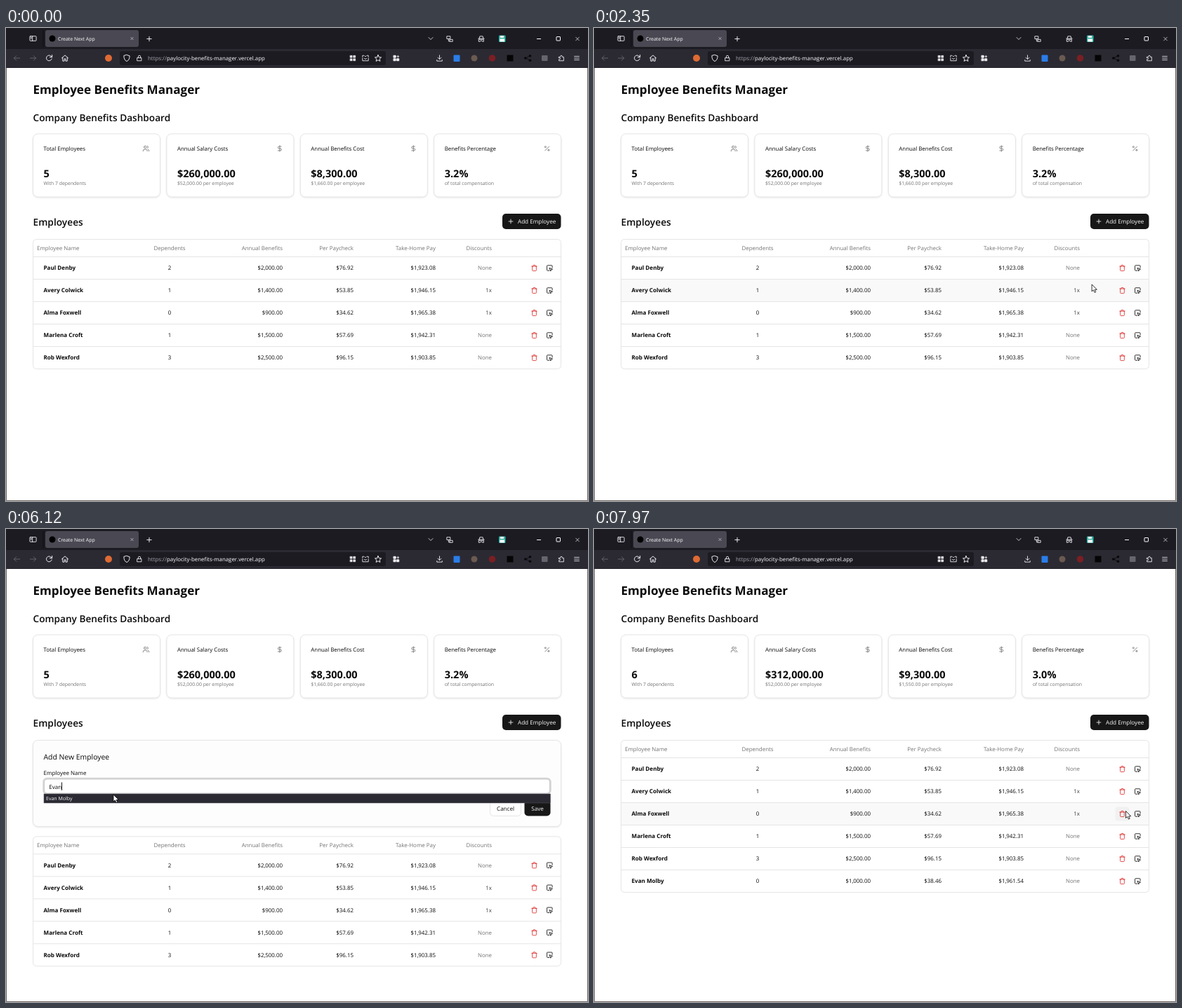
An HTML page for the animation above (8000 ms loop, 829x675 px).

```html
<!DOCTYPE html>
<html lang="en">
<head>
<meta charset="utf-8">
<title>Employee Benefits Manager</title>
<style>
  html, body { margin: 0; width: 100%; height: 100%; overflow: hidden; background: #fff; }
  svg { display: block; width: 100%; height: 100%; }
  text { font-family: "Open Sans", "Noto Sans", sans-serif; white-space: pre; text-rendering: geometricPrecision; }
  .card { filter: drop-shadow(0 1px 1px rgba(0, 0, 0, .09)); }
</style>
</head>
<body>
<svg id="stage" viewBox="0 0 829 675"></svg>
<script>
const INK = '#0a0a0a', GRAY = '#737373', LINE = '#e5e5e5', PALE = '#fbfbfe', DIM = '#6c6b76', RED = '#dc2626';
const LOOP = 8000, FORM_SHIFT = 137.3;
const FULL_NAME = 'Evan Molby';

// ---- drawing helpers ----
const text = (x, y, size, str, o = {}) =>
  `<text x="${x}" y="${y}" font-size="${size}" fill="${o.fill || INK}" font-weight="${o.weight || 400}"` +
  ` text-anchor="${o.anchor || 'start'}"${o.id ? ` id="${o.id}"` : ''}>${str}</text>`;

const box = (x, y, w, h, r, fill, more = '') =>
  `<rect x="${x}" y="${y}" width="${w}" height="${h}" rx="${r}" fill="${fill}" ${more}/>`;

const dot = (x, y, r, fill) => `<circle cx="${x}" cy="${y}" r="${r}" fill="${fill}"/>`;
const line = (x1, y1, x2, y2, c) => `<path d="M${x1} ${y1}L${x2} ${y2}" stroke="${c}"/>`;
const ring = (x, y, r) => `M${x - r} ${y}a${r} ${r} 0 1 0 ${2 * r} 0a${r} ${r} 0 1 0 ${-2 * r} 0`;

// Icon drawn on a 24 unit grid, centred on x, y
const icon = (d, x, y, size, color, weight = 2, fill = 'none') =>
  `<path d="${d}" transform="translate(${x - size / 2} ${y - size / 2}) scale(${size / 24})" fill="${fill}"` +
  ` stroke="${color}" stroke-width="${weight}" stroke-linecap="round" stroke-linejoin="round"/>`;

const ICON = {
  users: 'M16 21v-2a4 4 0 0 0-4-4H6a4 4 0 0 0-4 4v2M22 21v-2a4 4 0 0 0-3-3.87M16 3.13a4 4 0 0 1 0 7.75' + ring(9, 7, 4),
  dollar: 'M12 2v20M17 5H9.5a3.5 3.5 0 0 0 0 7h5a3.5 3.5 0 0 1 0 7H6',
  percent: 'M19 5L5 19' + ring(6.5, 6.5, 2.5) + ring(17.5, 17.5, 2.5),
  plus: 'M5 12h14M12 5v14',
  cross: 'M5 5L19 19M19 5L5 19',
  trash: 'M3 6h18M19 6v14a2 2 0 0 1-2 2H7a2 2 0 0 1-2-2V6M8 6V4a2 2 0 0 1 2-2h4a2 2 0 0 1 2 2v2',
  edit: 'M12 12l10 4l-4.5 1.5L16 22zM21 11V5a2 2 0 0 0-2-2H5a2 2 0 0 0-2 2v14a2 2 0 0 0 2 2h6',
  sidebar: 'M3 4h18a2 2 0 0 1 2 2v12a2 2 0 0 1-2 2H3a2 2 0 0 1-2-2V6a2 2 0 0 1 2-2zM10 4v16M4 8h3M4 12h3',
  chevron: 'M4 8l8 8l8-8',
  screens: 'M3 3h11v9H3zM8 12v8h4M13 14h9v7h-9z',
  hat: 'M2 11h20M5 11l2-8h10l2 8M4 14h16v7h-4l-2-3h-4l-2 3H4z',
  back: 'M22 12H2M10 4l-8 8l8 8',
  forward: 'M2 12h20M14 4l8 8l-8 8',
  reload: 'M20 14a8.5 8.5 0 1 1-2-8l3 3M21 2v7h-7',
  home: 'M2 12L12 3l10 9M5 10v11h5v-7h4v7h5V10',
  shield: 'M12 2l9 3c0 9-3 14-9 17c-6-3-9-8-9-17z',
  lock: 'M5 11h14v10H5zM8 11V7a4 4 0 0 1 8 0v4',
  grid: 'M3 3h7v7H3zM14 3h7v7h-7zM3 14h7v7H3zM14 14h7v7h-7z',
  page: 'M2 8V3h4M22 8V3h-4M2 12v9h20v-9M8 13c2 3 6 3 8 0M9 4l3 3l3-3',
  star: 'M12 2l3 7l7 .6l-5.300 4.800l1.600 7.200L12 18l-6.300 3.600l1.600-7.200L2 9.600L9 9z',
  gridPlus: 'M3 3h7v7H3zM3 14h7v7H3zM14 14h7v7h-7zM17.500 3v7M14 6.500h7',
  download: 'M12 2v13M6 10l6 6l6-6M3 18v4h18v-4',
  share: 'M18 5L6 12l12 7',
  puzzle: 'M4 8h5V6a3 3 0 0 1 6 0v2h5v13H4v-5h2a2.500 2.500 0 0 0 0-5H4z',
  menu: 'M3 5h18M3 12h18M3 19h18'
};

// ---- browser window ----
function browser() {
  const at = (name, x, y, size = 10, color = PALE) => icon(ICON[name], x, y, size, color);
  return box(0, 0, 829, 57, 0, '#1c1b22') + box(0, 30, 829, 26.500, 0, '#2b2a33') +
    line(53, 3, 53, 27, '#0f0e13') +
    box(56, 3, 133, 24, 3, '#4a4953') + dot(66, 15, 4.500, '#000') +
    text(74, 17.800, 6.950, 'Create Next App', { fill: PALE }) +
    at('sidebar', 38.500, 15, 10) + at('cross', 179.500, 15, 6) + at('plus', 204, 15.500, 11) +
    at('chevron', 605, 15, 9) + at('screens', 632, 15.500) + at('hat', 677, 15.500) +
    box(702, 10.500, 9.500, 9.500, 1, '#35b6a8') + box(704, 11, 5, 3, 0, '#eee') + box(703.500, 15.500, 6.500, 4, 0, '#fff') +
    line(756, 15.500, 762, 15.500, PALE) + box(784, 12.500, 5.500, 5.500, .5, 'none', `stroke="${PALE}"`) +
    at('cross', 814, 15.500, 8) +
    box(51, 33, 21, 20, 3, '#53525e', 'id="reloadBg"') +
    at('back', 15.500, 43, 10, DIM) + at('forward', 38.500, 43, 10, DIM) + at('reload', 61.500, 43, 11) + at('home', 84, 43, 11) +
    dot(146, 43, 5, '#e06a33') +
    box(162, 33, 379, 20, 3, '#1c1b22') + at('shield', 172, 43, 11) + at('lock', 190, 43, 10) +
    text(202, 46, 7.900, 'https://', { fill: '#a5a4ad' }) +
    text(229, 46, 7.880, 'paylocity-benefits-manager.vercel.app', { fill: PALE }) +
    icon(ICON.grid, 494, 43, 10, PALE, 1, PALE) + at('page', 512, 43) + at('star', 530, 43, 11) +
    icon(ICON.gridPlus, 556, 43, 10, PALE, 2, PALE) + at('download', 617.500, 43) +
    box(637.500, 38.500, 9, 9.500, 1, '#2b7de9') + dot(667, 43, 4.500, '#6a5a50') + dot(692.500, 43, 4.800, '#7a1f24') +
    box(713.500, 38.500, 9, 9, 0, '#050505') +
    at('share', 743, 43, 10, '#08080a') + dot(739.800, 43, 1.800, '#08080a') + dot(746.500, 39.800, 1.800, '#08080a') + dot(746.500, 46.200, 1.800, '#08080a') +
    box(763, 39, 8.500, 8, 1, '#66656d') + at('puzzle', 791, 43, 10) + at('menu', 813, 43, 9);
}

// ---- page ----
const CARDS = [
  ['Total Employees', 'users', '5', 'With 7 dependents'],
  ['Annual Salary Costs', 'dollar', '$260,000.00', '$52,000.00 per employee'],
  ['Annual Benefits Cost', 'dollar', '$8,300.00', '$1,660.00 per employee'],
  ['Benefits Percentage', 'percent', '3.2%', 'of total compensation']
];
const AFTER = [['6', CARDS[0][3]], ['$312,000.00', CARDS[1][3]], ['$9,300.00', '$1,550.00 per employee'], ['3.0%', CARDS[3][3]]];

const ROWS = [
  ['Paul Denby', '2', '$2,000.00', '$76.92', '$1,923.08', 'None'],
  ['Avery Colwick', '1', '$1,400.00', '$53.85', '$1,946.15', '1x'],
  ['Alma Foxwell', '0', '$900.00', '$34.62', '$1,965.38', '1x'],
  ['Marlena Croft', '1', '$1,500.00', '$57.69', '$1,942.31', 'None'],
  ['Rob Wexford', '3', '$2,500.00', '$96.15', '$1,903.85', 'None'],
  [FULL_NAME, '0', '$1,000.00', '$38.46', '$1,961.54', 'None']
];
const COLUMNS = [
  ['Employee Name', 44, 'start'], ['Dependents', 233, 'middle'], ['Annual Benefits', 394, 'end'],
  ['Per Paycheck', 495, 'end'], ['Take-Home Pay', 612, 'end'], ['Discounts', 692, 'end']
];
const rowTop = i => 326.500 + 32 * i;

function card([title, mark, value, note], i) {
  const x = 38.500 + 190.400 * i;
  return box(x, 151, 181, 90, 7, '#fff', `stroke="${LINE}" class="card"`) +
    text(x + 15, 175.400, 7.900, title) + icon(ICON[mark], x + 161, 172, 10, GRAY) +
    text(x + 15, 213, 14.500, value, { weight: 700, id: 'value' + i }) +
    text(x + 15, 224.300, 6.880, note, { fill: GRAY, id: 'note' + i });
}

function row(cells, i) {
  const mid = rowTop(i) + 16;
  const cols = cells.map((c, k) => k === 0
    ? text(53.500, mid + 2.800, 8.100, c, { weight: 700 })
    : text(COLUMNS[k][1], mid + 2.800, 7.900, c, { anchor: COLUMNS[k][2], fill: k < 5 ? INK : c === 'None' ? GRAY : '#404040' }));
  return `<g${i === 5 ? ' id="newRow"' : ''}>` + line(39, rowTop(i), 790, rowTop(i), LINE) + cols.join('') +
    icon(ICON.trash, 752.500, mid, 9.800, RED) + icon(ICON.edit, 774.300, mid, 10, INK) + '</g>';
}

function table() {
  return '<g id="table">' +
    box(39, 326.500, 751, 32, 0, '#f9f9f9', 'id="rowBg"') +
    box(742.500, 0, 20, 20, 4, '#f1f1f1', 'id="toolBg"') +
    COLUMNS.map(([name, x, anchor]) => text(x, 317, 7.950, name, { fill: GRAY, anchor })).join('') +
    ROWS.map(row).join('') +
    box(38.500, 301.500, 752, 185, 5, 'none', `stroke="${LINE}" id="tableBox"`) + '</g>';
}

function form() {
  return '<g id="form">' +
    box(38.500, 301.500, 752, 123, 7, '#fdfdfd', `stroke="${LINE}" class="card"`) +
    text(53.500, 329, 10.400, 'Add New Employee') + text(53.500, 350.800, 8, 'Employee Name') +
    box(53.500, 356, 722, 22, 5, '#fff', 'stroke="#d6d6d6" stroke-width="2.500"') +
    box(54.500, 357, 720, 20, 4, 'none', 'stroke="#b5b5b5" stroke-width=".5"') +
    text(61.300, 370.600, 8, 'Enter employee name', { fill: GRAY, id: 'hint' }) +
    text(61.300, 370.600, 8, '', { id: 'typed' }) + box(61, 361.500, .9, 11.500, 0, '#000', 'id="caret"') +
    box(689.500, 388, 44, 21.500, 5, '#fff', `stroke="${LINE}"`) + text(711.500, 401.800, 8.050, 'Cancel', { anchor: 'middle' }) +
    box(738.500, 387.500, 37, 22, 5, '#171717', 'id="saveBg"') + text(757, 401.800, 8.050, 'Save', { anchor: 'middle', fill: '#fafafa' }) +
    '<g id="popup">' + box(54, 378, 721.500, 13, 0, '#2b2a33', 'stroke="#52525e" stroke-width=".5"') +
    text(57, 387.300, 7, FULL_NAME, { fill: PALE }) + '</g></g>';
}

document.getElementById('stage').innerHTML =
  box(0, 0, 829, 675, 0, '#fff') + browser() +
  text(38.500, 94, 17.100, 'Employee Benefits Manager', { weight: 700 }) +
  text(38.500, 132.500, 13.650, 'Company Benefits Dashboard', { weight: 600 }) +
  CARDS.map(card).join('') +
  text(38.500, 282, 13.750, 'Employees', { weight: 600 }) +
  box(707, 265, 83.500, 22, 5, '#171717', 'id="addBg"') + icon(ICON.plus, 719, 276, 10, '#fafafa') +
  text(729, 279.200, 8.150, 'Add Employee', { fill: '#fafafa' }) +
  table() + form() +
  '<path d="M.5 57V674.500H828.500V57" fill="none" stroke="#6f6460"/>' +
  '<path id="arrow" d="M0 0V10L2.300 8L4 11.600L5.700 10.800L4.100 7.400H7.300Z" fill="#fff" stroke="#000" stroke-width=".8"/>' +
  '<path id="beam" d="M-2-5.500Q0-5.500 0-4.500Q0-5.500 2-5.500M0-4.500V4.500M-2 5.500Q0 5.500 0 4.500Q0 5.500 2 5.500" fill="none" stroke="#222" stroke-width=".9"/>';

// ---- motion ----
// time, x, y of the pointer
const POINTER = [
  [70, 400, 674], [820, 310, 330], [1500, 62, 46], [1720, 62, 46], [2490, 770, 396], [2850, 771, 345],
  [3260, 758.500, 274], [3860, 758.500, 274], [4490, 131.500, 373.500], [5980, 131.500, 373.500],
  [6120, 153, 379], [6260, 156, 383], [6400, 156, 383], [6730, 690, 433], [7080, 757.500, 412], [7220, 757.500, 402.500]
];
const KEYS = [4960, 5170, 5240, 5370];
const OPEN = 3860, POPUP = 5030, PICK = 6400, SAVE = 7430;

const el = {};
document.querySelectorAll('[id]').forEach(e => el[e.id] = e);
const within = (t, a, b) => t >= a && t < b;
const show = (e, on) => e.setAttribute('visibility', on ? 'visible' : 'hidden');
const write = (e, s) => { if (e.textContent !== s) e.textContent = s; };

function pointerAt(t) {
  const next = POINTER.findIndex(k => k[0] > t);
  if (next < 0) return POINTER[POINTER.length - 1].slice(1);
  if (next === 0) return POINTER[0].slice(1);
  const [t0, x0, y0] = POINTER[next - 1], [t1, x1, y1] = POINTER[next];
  let p = (t - t0) / (t1 - t0);
  p = p * p * (3 - 2 * p);
  return [x0 + (x1 - x0) * p, y0 + (y1 - y0) * p];
}

function render(t) {
  const open = within(t, OPEN, SAVE), saved = t >= SAVE;
  const popup = within(t, POPUP, PICK);
  const [x, y] = pointerAt(t);
  const over = (l, top, w, h) => within(x, l, l + w) && within(y, top, top + h);
  const visible = t >= 70 && !within(t, KEYS[0], 5980);

  const beam = open && over(54, 356, 722, 22);
  const place = `translate(${x.toFixed(2)} ${y.toFixed(2)})`;
  el.arrow.setAttribute('transform', place);
  el.beam.setAttribute('transform', place);
  show(el.arrow, visible && !beam);
  show(el.beam, visible && beam);

  show(el.reloadBg, visible && over(51, 33, 21, 20));
  el.addBg.setAttribute('fill', over(707, 265, 83, 22) ? '#2e2e2e' : '#171717');
  el.saveBg.setAttribute('fill', over(738.500, 387.500, 37, 22) ? '#2e2e2e' : '#171717');

  const count = saved ? 6 : 5, shift = open ? FORM_SHIFT : 0;
  el.table.setAttribute('transform', `translate(0 ${shift})`);
  el.tableBox.setAttribute('height', 25 + 32 * count);
  show(el.newRow, saved);
  const i = Math.floor((y - shift - rowTop(0)) / 32);
  const onRow = visible && i >= 0 && i < count && within(x, 39, 790);
  show(el.rowBg, onRow);
  el.rowBg.setAttribute('y', rowTop(i));
  const tool = [742.500, 764.300].find(l => over(l, rowTop(i) + 6 + shift, 20, 20));
  show(el.toolBg, onRow && tool !== undefined);
  el.toolBg.setAttribute('x', tool || 742.500);
  el.toolBg.setAttribute('y', rowTop(i) + 6);

  CARDS.forEach((c, k) => {
    write(el['value' + k], saved ? AFTER[k][0] : c[2]);
    write(el['note' + k], saved ? AFTER[k][1] : c[3]);
  });

  el.form.style.display = open ? '' : 'none';
  if (!open) return;
  const typed = t >= PICK ? FULL_NAME : FULL_NAME.slice(0, KEYS.filter(k => t >= k).length);
  write(el.typed, typed);
  el.hint.style.display = typed ? 'none' : '';
  el.popup.style.display = popup ? '' : 'none';
  const end = typed ? el.typed.getComputedTextLength() : 0;
  el.caret.setAttribute('x', 61.200 + end);
  el.caret.style.display = within(t, 3930, 5570) || within(t, 6100, 6930) ? '' : 'none';
}

const start = performance.now();
function tick() {
  render((performance.now() - start) % LOOP);
  requestAnimationFrame(tick);
}
tick();
</script>
</body>
</html>
```
